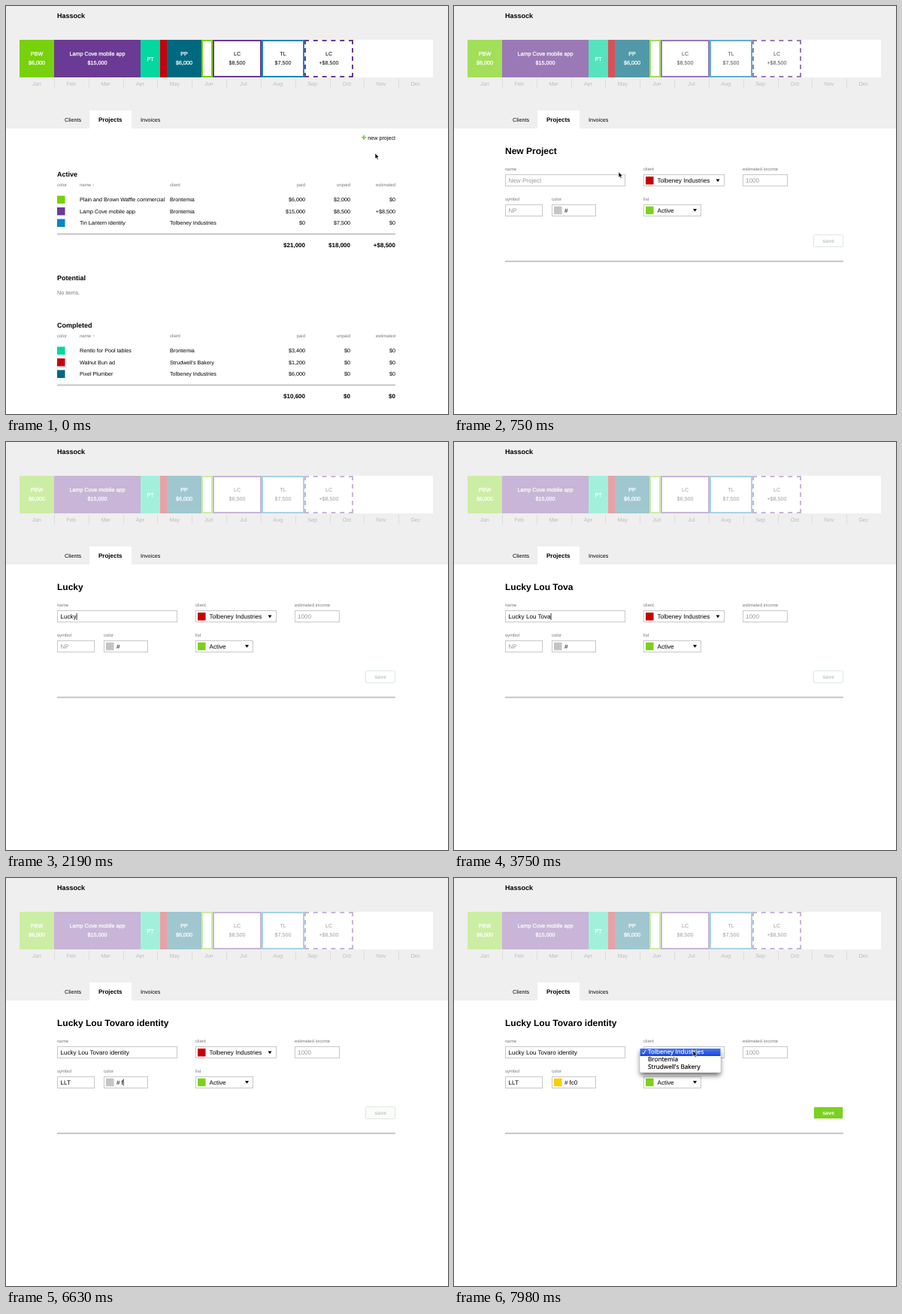
These frames come from a looping animation (588x543 px, 8 s). An HTML page:

```html
<!DOCTYPE html>
<html lang="en">
<head>
<meta charset="utf-8">
<title>Project planner</title>
<style>
html, body { margin: 0; width: 100%; height: 100%; overflow: hidden; background: #fff; }
svg { display: block; width: 588px; height: 543px; }
text { font: 7.2px "Liberation Sans", Arial, sans-serif; fill: #000; white-space: pre; text-rendering: geometricPrecision; }
.mid { text-anchor: middle; }
.end { text-anchor: end; }
.bold { font-weight: bold; }
.head { font-size: 9px; font-weight: bold; }
.sum { font-size: 8px; font-weight: bold; }
.title { font-size: 12px; font-weight: bold; }
.small { font-size: 6px; fill: #777; }
.month { fill: #bbb; }
.grey { fill: #777; }
.field { font-size: 8.1px; }
.empty { fill: #999; }
.onbar { fill: #fff; stroke: #fff; stroke-width: .25px; }
.box { fill: #fff; stroke: #c8c8c8; }
.option { font: 8.2px "Open Sans", "Noto Sans", sans-serif; stroke: #000; stroke-width: .15px; }
.chosen { fill: #fff; stroke: #fff; }

#chart, #list, #form, #swatch, #save rect, #save text, #menu, #cursor, #arrow, #beam {
  animation: 8s linear infinite;
}
#chart { animation-name: fade; }
#list { animation-name: leave; animation-timing-function: step-end; }
#form { animation-name: enter; animation-timing-function: step-end; }
#swatch { animation-name: tint; animation-timing-function: step-end; }
#save rect { animation-name: ready; animation-timing-function: ease-in-out; }
#save text { animation-name: readyText; animation-timing-function: ease-in-out; font-size: 7px; font-weight: bold; }
#menu { animation-name: open; animation-timing-function: step-end; }
#cursor { animation-name: move; }
#arrow { animation-name: arrow; animation-timing-function: step-end; }
#beam { animation-name: beam; animation-timing-function: step-end; }

@keyframes fade {
  0% { opacity: 1; }
  7.5% { opacity: 1; animation-timing-function: ease-in-out; }
  11.25%, 100% { opacity: .37; }
}
@keyframes leave { 0% { visibility: visible; } 7.125%, 100% { visibility: hidden; } }
@keyframes enter { 0% { visibility: hidden; } 7.125%, 100% { visibility: visible; } }
@keyframes tint { 0% { fill: #c4c4c4; } 85.5%, 100% { fill: #fc0; } }
@keyframes ready {
  0%, 82.375% { fill: #fff; stroke: #dce8e4; }
  86.25%, 100% { fill: #7bd11f; stroke: #f0f9e2; }
}
@keyframes readyText { 0%, 82.375% { fill: #c4c4c4; } 86.25%, 100% { fill: #fff; } }
@keyframes open { 0% { visibility: hidden; } 98.25%, 100% { visibility: visible; } }
@keyframes move {
  0% { transform: translate(491px, 196px); animation-timing-function: ease-in-out; }
  3.75%, 5.25% { transform: translate(495px, 176px); animation-timing-function: ease-in; }
  8.25% { transform: translate(289px, 214px); animation-timing-function: ease-out; }
  11.625% { transform: translate(147px, 228px); }
  13%, 92.6% { transform: translate(144px, 231px); }
  92.625% { transform: translate(168px, 226px); }
  94.5% { transform: translate(240px, 207px); }
  97%, 100% { transform: translate(318px, 230px); }
}
@keyframes arrow {
  0% { visibility: visible; }
  10.8% { visibility: hidden; }
  93.2%, 100% { visibility: visible; }
}
@keyframes beam {
  0% { visibility: hidden; }
  10.8% { visibility: visible; }
  20.625% { visibility: hidden; }
  92.625% { visibility: visible; }
  93.2%, 100% { visibility: hidden; }
}
</style>
</head>
<body>
<svg viewBox="0 0 588 543">
  <defs>
    <linearGradient id="blue" x2="0" y2="1">
      <stop stop-color="#4a76ee"/><stop offset="1" stop-color="#1746d8"/>
    </linearGradient>
    <filter id="shadow" x="-20%" y="-30%" width="140%" height="200%">
      <feDropShadow dx="0" dy="4" stdDeviation="3" flood-opacity=".55"/>
    </filter>
  </defs>

  <rect width="588" height="163" fill="#efefef"/>
  <text class="head" x="68" y="15.700">Hassock</text>
  <rect x="18" y="45" width="550" height="50" fill="#fff"/>
  <g id="chart"></g>
  <g id="months"></g>
  <rect x="111" y="139" width="56" height="25" fill="#fff"/>
  <text x="78" y="154.2">Clients</text>
  <text class="sum" x="123" y="154.2">Projects</text>
  <text x="179" y="154.2">Invoices</text>

  <g id="list"></g>

  <g id="form">
    <text class="title" id="title" x="68" y="197.2"></text>
    <g id="fields"></g>
    <rect x="255" y="227" width="10.5" height="10.5" fill="#c60000"/>
    <text class="field" x="270.5" y="235.2">Tolbeney Industries</text>
    <path d="M348.500 230.500h5l-2.500 3.800z"/>
    <text class="field empty" x="388" y="235.2">1000</text>
    <rect id="swatch" x="133" y="266.700" width="10.5" height="10.5"/>
    <text class="field" x="147" y="274.8">#</text>
    <rect x="255" y="266.700" width="10.5" height="10.5" fill="#7bd11f"/>
    <text class="field" x="270.5" y="274.8">Active</text>
    <path d="M318 270h5l-2.500 3.800z"/>
    <text class="field" id="name" x="72.5" y="235.2"></text>
    <text class="field" id="symbol" x="72.5" y="274.8"></text>
    <text class="field" id="color" x="153.5" y="274.8"></text>
    <rect id="caret" width=".8" height="9"/>
    <g id="save">
      <rect x="478.5" y="304.5" width="39" height="16" rx="1.5"/>
      <text class="mid" x="498" y="314.8">save</text>
    </g>
    <rect x="68" y="338.8" width="450" height="2" fill="#c6c6c6"/>
  </g>

  <g id="menu">
    <path d="M247.500 227h107v29q0 3-3 3h-101q-3 0-3-3z" fill="#fff" filter="url(#shadow)"/>
    <rect x="247.5" y="227" width="107" height="10" fill="url(#blue)"/>
    <path d="M250.500 232l1.500 2.200 3-5" fill="none" stroke="#fff"/>
    <text class="option chosen" x="258" y="234.3">Tolbeney Industries</text>
    <text class="option" x="258" y="244.3">Brontemia</text>
    <text class="option" x="258" y="254.3">Strudwell's Bakery</text>
  </g>

  <g id="cursor">
    <path id="arrow" d="M0 0v7.300l1.700-1.500 1.200 2.700 1.300-.6-1.200-2.600h2.300z" stroke="#fff" stroke-width=".6"/>
    <path id="beam" d="M-1.500-4h1l.5.5.5-.5h1M0-3.500v7M-1.500 4h1l.5-.5.5.5h1" fill="none" stroke="#222" stroke-width=".9"/>
  </g>
</svg>
<script>
const $ = id => document.getElementById(id);
const text = (x, y, str, cls = '') => `<text class="${cls}" x="${x}" y="${y}">${str}</text>`;
const rect = (x, y, w, h, attrs) => `<rect x="${x}" y="${y}" width="${w}" height="${h}" ${attrs}/>`;

const GREEN = '#78d10c', PURPLE = '#6b3a94', TEAL = '#05d7a0', RED = '#c8000b', PETROL = '#00697f', BLUE = '#0a84c4';

// Timeline
const label = (x, w, lines, cls) =>
  lines.map((s, i) => text(x + w / 2, (lines.length > 1 ? 66.3 : 72.5) + i * 11.7, s, 'mid ' + cls)).join('');
const bar = (x, w, color, ...lines) =>
  rect(x, 45, w, 50, `fill="${color}"`) + label(x, w, lines, 'onbar');
const frame = (x, w, color, ...lines) =>
  rect(x + 1, 46, w - 2, 48, `fill="#fff" stroke="${color}" stroke-width="2"`) + label(x, w, lines, '');

// Each side begins and ends with a dash, so the corners are closed.
const dashedSide = (path, length, color) => {
  const dash = 6, count = Math.round((length + dash) / (2 * dash));
  const gap = (length - count * dash) / (count - 1);
  return `<path d="${path}" fill="none" stroke="${color}" stroke-width="2" stroke-dasharray="${dash} ${gap}"/>`;
};
const dashedFrame = (x, w, color, ...lines) =>
  rect(x, 45, w, 50, 'fill="#fff"') +
  [46, 94].map(y => dashedSide(`M${x} ${y}h${w}`, w, color)).join('') +
  [x + 1, x + w - 1].map(side => dashedSide(`M${side} 45v50`, 50, color)).join('') +
  label(x, w, lines, '');

$('chart').innerHTML =
  bar(18, 46, GREEN, 'PBW', '$6,000') +
  bar(64, 115, PURPLE, 'Lamp Cove mobile app', '$15,000') +
  bar(179, 26, TEAL, 'PT') +
  bar(205, 9, RED) +
  bar(214, 46, PETROL, 'PP', '$6,000') +
  frame(260, 15, GREEN) +
  frame(275, 65, PURPLE, 'LC', '$8,500') +
  frame(340, 57, '#1789b8', 'TL', '$7,500') +
  dashedFrame(397, 65, PURPLE, 'LC', '+$8,500');

const MONTH = 550 / 12;
$('months').innerHTML = 'Jan Feb Mar Apr May Jun Jul Aug Sep Oct Nov Dec'.split(' ').map((m, i) =>
  text(18 + MONTH * (i + .5), 106.3, m, 'mid month') +
  (i ? rect(Math.round(18 + MONTH * i), 97, 1, 12, 'fill="#ddd"') : '')).join('');

// Project tables
const amounts = (y, values, cls) => values.map((v, i) => text(398 + 60 * i, y, v, 'end ' + cls)).join('');
const table = (y, heading, rows, totals) =>
  text(68, y, heading, 'head') +
  text(68, y + 13, 'color', 'small') + text(98, y + 13, 'name ↑', 'small') + text(218, y + 13, 'client', 'small') +
  amounts(y + 13, ['paid', 'unpaid', 'estimated'], 'small') +
  rows.map(([color, name, client, ...values], i) => {
    const base = y + 33.3 + 15.5 * i;
    return rect(68, base - 7.8, 10.5, 10.5, `fill="${color}"`) +
      text(98, base, name) + text(218, base, client) + amounts(base, values, '');
  }).join('') +
  rect(68, y + 75.5, 450, 2, 'fill="#c6c6c6"') +
  amounts(y + 93.7, totals, 'sum');

$('list').innerHTML =
  rect(473, 174.2, 6, 1.6, `fill="${GREEN}"`) + rect(475.2, 172, 1.6, 6, `fill="${GREEN}"`) +
  text(518, 177.6, 'new project', 'end') +
  table(227, 'Active', [
    [GREEN, 'Plain and Brown Waffle commercial', 'Brontemia', '$6,000', '$2,000', '$0'],
    [PURPLE, 'Lamp Cove mobile app', 'Brontemia', '$15,000', '$8,500', '+$8,500'],
    [BLUE, 'Tin Lantern identity', 'Tolbeney Industries', '$0', '$7,500', '$0']
  ], ['$21,000', '$18,000', '+$8,500']) +
  text(68, 364.8, 'Potential', 'head') + text(68, 383.7, 'No items.', 'grey') +
  table(428, 'Completed', [
    [TEAL, 'Rentlo for Pool tables', 'Brontemia', '$3,400', '$0', '$0'],
    [RED, 'Walnut Bun ad', "Strudwell's Bakery", '$1,200', '$0', '$0'],
    [PETROL, 'Pixel Plumber', 'Tolbeney Industries', '$6,000', '$0', '$0']
  ], ['$10,600', '$0', '$0']);

// Form
const field = (x, y, w, name) =>
  text(x, y - 5, name, 'small') + rect(x + .5, y + .5, w - 1, 15, 'class="box"');
$('fields').innerHTML =
  field(68, 224, 160, 'name') + field(252, 224, 108, 'client') + field(384, 224, 60, 'estimated income') +
  field(68, 264, 50, 'symbol') + field(130, 264, 59, 'color') + field(252, 264, 77, 'list');

const inputs = [
  { id: 'name', value: 'Lucky Lou Tovaro identity', hint: 'New Project', focus: 1200, blur: 5280,
    keys: [1650, 1800, 1920, 2040, 2160, 2400, 2490, 2610, 2730, 2880, 3000, 3150, 3600, 3690, 3870,
      3990, 4140, 4500, 4590, 4680, 4860, 4950, 5040, 5130, 5220] },
  { id: 'symbol', value: 'LLT', hint: 'NP', focus: 5280, blur: 6300, keys: [5670, 5850, 6000] },
  { id: 'color', value: 'fc0', hint: '', focus: 6300, blur: 7860, keys: [6630, 6750, 6840] }
];
const HALF_STEP = 15; // keeps a key press from landing one screen refresh late
const clock = $('chart').getAnimations()[0];
const caret = $('caret');

function render() {
  const t = ((clock.currentTime || 0) + HALF_STEP) % 8000;
  let focused = false;
  for (const { id, value, hint, focus, blur, keys } of inputs) {
    const el = $(id);
    const typed = value.slice(0, keys.filter(k => k <= t).length);
    el.textContent = typed || hint;
    el.classList.toggle('empty', !typed);
    if (id === 'name') $('title').textContent = typed || hint;
    if (t >= focus && t < blur) {
      focused = true;
      caret.setAttribute('x', +el.getAttribute('x') + (typed ? el.getComputedTextLength() : 0));
      caret.setAttribute('y', el.getAttribute('y') - 7.4);
    }
  }
  caret.style.display = focused ? '' : 'none';
  requestAnimationFrame(render);
}
render();
</script>
</body>
</html>
```
